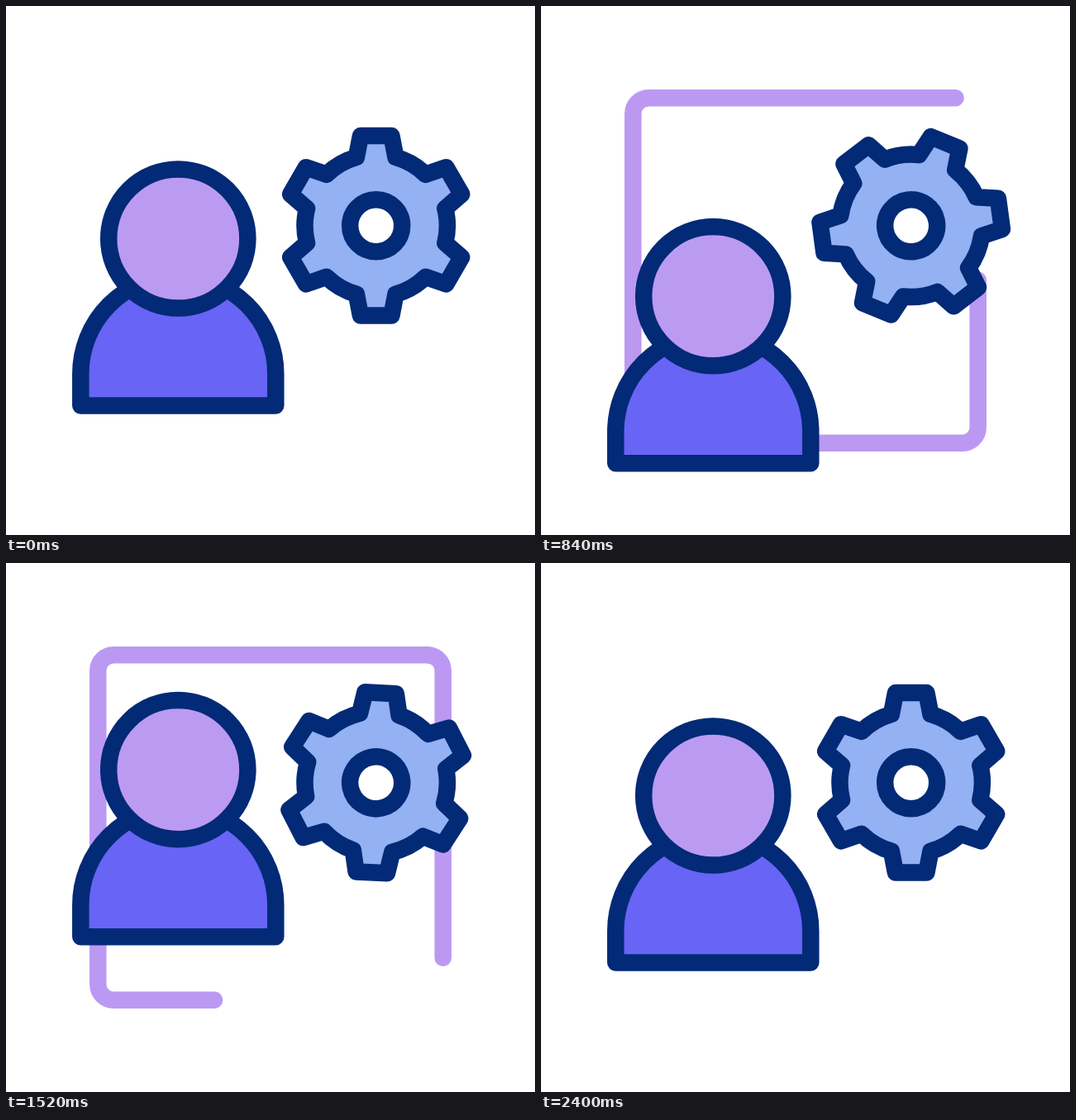
These frames come from a looping animation (640x640 px, 2480 ms). An HTML page:

```html
<!DOCTYPE html>
<html lang="en">
<head>
<meta charset="utf-8">
<title>User settings</title>
<style>
  html, body { margin: 0; height: 100%; overflow: hidden; background: #fff; }
  svg { display: block; width: 100%; height: 100%; }
  .ink { stroke: #032a76; stroke-width: 20.5; stroke-linejoin: round; }
</style>
</head>
<body>
<svg viewBox="0 0 640 640">
  <path id="line" fill="none" stroke="#bb99f3" stroke-width="20.5" stroke-linecap="round"/>
  <g id="person" class="ink">
    <path d="M90.3 483.6V445a118 118 0 0 1 236 0v38.6z" fill="#6864f6"/>
    <circle cx="208.3" cy="281.5" r="84.1" fill="#bb9af2"/>
  </g>
  <g id="gear" class="ink">
    <path id="teeth" fill="#93b1f3"/>
    <circle r="31.5" fill="#fff"/>
  </g>
</svg>
<script>
const $ = id => document.getElementById(id);
const LOOP = 2480, STEP = 40, END = 2400;

// Symmetric ease, cubic-bezier(2/3, 0, 1/3, 1), solved by bisection
function ease(u) {
  if (u <= 0) return 0;
  if (u >= 1) return 1;
  let lo = 0, hi = 1;
  for (let i = 0; i < 24; i++) {
    const p = (lo + hi) / 2, q = 1 - p;
    if (2 * q * q * p + q * p * p + p ** 3 < u) lo = p; else hi = p;
  }
  return lo * lo * (3 - 2 * lo);
}

// Keys are [time, value] pairs
function tween(t, keys) {
  let value = keys[0][1];
  for (let i = 1; i < keys.length; i++) {
    const [t0, v0] = keys[i - 1], [t1, v1] = keys[i];
    if (t >= t0) value = v0 + (v1 - v0) * ease((t - t0) / (t1 - t0));
  }
  return value;
}

function gearPath() {
  const at = (r, deg) => {
    const a = deg * Math.PI / 180;
    return (r * Math.sin(a)).toFixed(2) + ' ' + (-r * Math.cos(a)).toFixed(2);
  };
  let d = '';
  for (let a = 0; a < 360; a += 60) {
    d += `${a ? 'A86 86 0 0 1' : 'M'}${at(86.2, a - 16)}L${at(110.3, a - 9.8)}` +
         `L${at(110.3, a + 9.8)}L${at(86.2, a + 16)}`;
  }
  return d + `A86 86 0 0 1${at(86.2, -16)}z`;
}

// Two laps around the frame, so the moving stroke can pass its own start
const lap = 'v379.4a19 19 0 0 1-19 19h-379.4a19 19 0 0 1-19-19v-379.4a19 19 0 0 1 19-19h379.4a19 19 0 0 1 19 19';
const LAP = 4 * 379.4 + 2 * Math.PI * 19;
$('line').setAttribute('d', 'M528.7 130.3' + lap + lap);
$('teeth').setAttribute('d', gearPath());

const personKeys = [[0, 0], [715, 72], [1520, -31.4], [2315, 0]];
const gearKeys = [[0, 0], [682, -105], [1545, 123], [2300, 0]];

function draw(t) {
  const y = tween(t, personKeys), angle = tween(t, gearKeys);
  const shift = 21.8 + 0.2137 * t;
  const head = shift + LAP * ease(t / 1265);
  const tail = shift + LAP * ease((t - 1000) / 1400);
  $('person').setAttribute('transform', `translate(0 ${y})`);
  $('gear').setAttribute('transform', `translate(447.7 265.8) rotate(${angle})`);
  const line = $('line');
  line.style.display = head - tail > 0.01 ? '' : 'none';
  line.setAttribute('stroke-dasharray', `${head - tail} 9999`);
  line.setAttribute('stroke-dashoffset', -tail);
}

function tick() {
  const t = performance.now() % LOOP;
  draw(Math.min(END, Math.floor(t / STEP) * STEP));
  requestAnimationFrame(tick);
}
tick();
</script>
</body>
</html>
```
